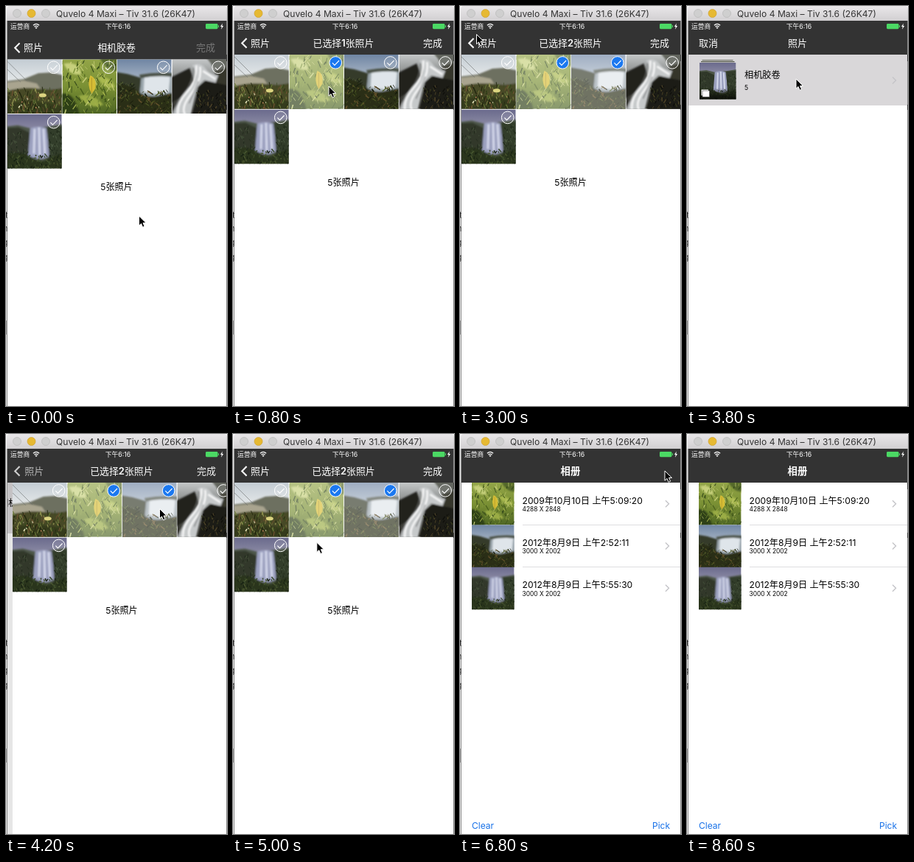
An HTML page for the animation above (8.8 s loop, 300 by 543 pixels).

```html
<!DOCTYPE html>
<html lang="zh-CN">
<head>
<meta charset="utf-8">
<title>Photo picker</title>
<style>
html, body { margin: 0; width: 100%; height: 100%; overflow: hidden; background: #fff; }
svg { display: block; width: 100vw; height: 100vh; }
text { font-family: Inter, "Noto Sans CJK SC", "Noto Sans CJK", "Noto Sans", sans-serif; white-space: pre; }
</style>
</head>
<body>
<svg id="stage" viewBox="0 0 300 543"></svg>
<script>
const LOOP = 8800, STEP = 200, W = 297, NAV = '#333';
const stage = document.getElementById('stage');

// ---- drawing helpers ----
const rect = (x, y, w, h, fill, more = '') =>
  `<rect x="${x}" y="${y}" width="${w}" height="${h}" fill="${fill}" ${more}/>`;
const path = (d, fill, more = '') => `<path d="${d}" fill="${fill}" ${more}/>`;
const line = (d, color, w, more = '') =>
  path(d, 'none', `stroke="${color}" stroke-width="${w}" ${more}`);
const text = (x, y, size, str, fill = '#000', more = '') =>
  `<text x="${x}" y="${y}" font-size="${size}" fill="${fill}" ${more}>${str}</text>`;
const group = (id, body, more = '') => `<g id="${id}" ${more}>${body}</g>`;
const soft = body => `<g filter="url(#blur)">${body}</g>`;
const photo = (n, x, y, size) =>
  `<use href="#photo${n}" transform="translate(${x} ${y}) scale(${size / 74})"/>`;
const grad = (id, ...colors) =>
  `<linearGradient id="${id}" x1="0" y1="0" x2="0" y2="1">${colors.map((c, i) =>
    `<stop offset="${i / (colors.length - 1)}" stop-color="${c}"/>`).join('')}</linearGradient>`;
const MID = 'text-anchor="middle"';

function rng(seed) {
  return () => (seed = (seed * 16807) % 2147483647) / 2147483647;
}

// Scattered leaves or grass inside a box
function leaves(seed, count, [x, y, w, h], colors, size, tilt) {
  const r = rng(seed);
  let out = '';
  for (let i = 0; i < count; i++) {
    const px = x + r() * w, py = y + r() * h, s = size * (0.5 + r());
    const dx = (r() - 0.5) * 2 * tilt * s, c = colors[Math.floor(r() * colors.length)];
    out += line(`M${px.toFixed(1)} ${py.toFixed(1)}l${dx.toFixed(1)} ${(-s).toFixed(1)}`, c, (0.6 + r()).toFixed(1));
  }
  return out;
}

// ---- photos, each in a 74 x 74 box ----
const photos = [
  rect(0, 0, 74, 74, 'url(#sky1)') +
  soft(path('M-4 30L22 27 42 19 58 18 78 22V50H-4Z', '#6d6f60') +
    path('M-4 32L22 29 40 33 46 42 -4 46Z', '#a9a48f') +
    path('M-4 44Q20 37 42 40T78 38V78H-4Z', '#474a26') +
    path('M-4 62Q30 52 78 64V78H-4Z', '#343a1b')) +
  leaves(11, 150, [0, 44, 74, 34], ['#23280f', '#69783a', '#8a8c4c', '#3a4a1e', '#6a5030'], 5, 0.6) +
  leaves(5, 9, [5, 52, 62, 18], ['#e6e8c0', '#c98a62'], 2, 1) +
  `<ellipse cx="48" cy="49" rx="5" ry="2.6" fill="#dcd480"/>` +
  line('M0 3L27 30M0 14L18 31', '#6a6d6c', 0.6),

  rect(0, 0, 74, 74, 'url(#leaf2)') +
  soft(path('M-4 48Q16 40 24 78H-4Z', '#2f3f16') + path('M50 -4Q60 18 78 16V-4Z', '#55692a') +
    path('M2 6Q22 2 26 20 10 24 2 6Z', '#c6d07c') + path('M48 24Q66 22 72 38 56 42 48 24Z', '#a9b950') +
    path('M22 50Q42 44 56 62 36 70 22 50Z', '#9aac45')) +
  leaves(23, 150, [0, 5, 74, 73], ['#a3b04a', '#4a601c', '#c6cd78', '#34481a', '#7c9238'], 6, 1) +
  path('M38 22Q47 25 45 40L40 47Q33 36 38 22Z', '#d6bd35') +
  line('M40 25L40 45', '#a58c28', 0.7),

  rect(0, 0, 74, 74, 'url(#sky3)') +
  soft(path('M-4 17L14 20 28 24 36 27V60H-4Z', '#343a2c') +
    path('M33 22Q54 17 78 21V52H30Z', '#9aa5ac') +
    path('M37 24Q54 20 72 24L70 45Q54 50 36 44Z', '#dfe5ea') +
    path('M30 21Q52 17 78 19V24Q52 21 32 26Z', '#4c5248') +
    path('M-4 33Q17 33 28 43T54 50L78 45V78H-4Z', '#2a2e15')) +
  leaves(31, 140, [0, 44, 74, 33], ['#4e5824', '#15190b', '#62502a', '#343f1a'], 3, 1.5) +
  leaves(37, 40, [0, 32, 28, 20], ['#4c5630', '#1e2414'], 3, 1.5),

  rect(0, 0, 74, 74, 'url(#sky4)') +
  soft(path('M-4 26L12 18 24 12 30 30 14 50 -4 62Z', '#23231e') +
    path('M44 -4Q54 4 58 16L78 24V-4Z', '#64665f') +
    path('M58 16L78 10V40L60 34Z', '#34342c') +
    path('M27 8Q39 3 45 12T63 22L59 33 44 28 34 38 25 78H-2Q8 54 24 38T27 8Z', '#c6c9ca') +
    path('M36 37L46 29 78 36V78H28Z', '#1c1b14')) +
  soft(line('M33 8Q34 30 20 45T8 76M38 10Q41 28 26 47T18 76M42 16L59 27', '#fbfbfb', 2.4) +
    line('M29 12Q29 30 17 45T2 74M36 30L23 60', '#77797a', 1.2)) +
  leaves(47, 70, [34, 44, 40, 33], ['#4a4026', '#0e0e0a', '#33351c'], 3.5, 0.8),

  rect(0, 0, 74, 74, 'url(#sky5)') +
  soft(path('M-4 17L14 15 30 19 54 17 78 13V78H-4Z', '#4d5648') +
    path('M-4 19L15 18 30 25 33 56 -4 66Z', '#303829') +
    path('M31 19Q42 15 53 19L58 56Q44 66 28 56Z', '#9ba0bf') +
    path('M54 18L78 16V68L57 60Z', '#333c2b') +
    line('M37 20L36 54M43 18L44 56M49 20L51 54', '#d3d7ea', 3) +
    path('M-4 54Q16 48 32 58T56 60L78 52V78H-4Z', '#2a341f')) +
  leaves(61, 110, [0, 57, 74, 20], ['#4b5830', '#182213', '#38482a'], 3, 1) +
  leaves(71, 50, [57, 24, 17, 38], ['#4a5840', '#222c1c'], 3, 0.7) +
  leaves(83, 45, [0, 26, 27, 32], ['#424d38', '#222b1d'], 3, 0.7)
];

// ---- screen parts ----
const chevron = (x, y) => line(`M${x} ${y - 4.5}l4.5 4.5 -4.5 4.5`, '#c4c4c8', 1.4);

const cells = photos.map((_, i) => ({ x: 2 + (i % 4) * 74.5, y: 66 + Math.floor(i / 4) * 74.5 }));

const gridCell = ({ x, y }, i) => photo(i + 1, x, y, 73.7) +
  rect(x, y, 73.7, 73.7, '#fff', `id="veil${i}" opacity=".33"`) +
  `<circle id="dot${i}" cx="${x + 62.7}" cy="${y + 10.9}" r="8.3" stroke="#fff" stroke-width="1"/>` +
  line(`M${x + 58.4} ${y + 11.2}l3 3.2 6.2 -6.4`, '#fff', 1.1);

const shots = [
  [2, '2009年10月10日 上午5:09:20', '4288 X 2848'],
  [3, '2012年8月9日 上午2:52:11', '3000 X 2002'],
  [5, '2012年8月9日 上午5:55:30', '3000 X 2002']
];

const shotRow = ([n, date, size], i) => {
  const y = 66 + i * 57.3;
  return photo(n, 16, y, 57.6) + text(84.5, y + 28.7, 12.1, date) +
    text(84.5, y + 39, 8.4, size) + chevron(279, y + 28.7) +
    (i < 2 ? rect(85, y + 57, 214, 0.6, '#c8c7cc') : '');
};

const basePage = rect(2, 20, W, 523, '#fff') + rect(2, 20, W, 46, NAV) +
  text(150, 54.8, 13.4, '相册', '#fff', MID + ' font-weight="600"') +
  group('shots', shots.map(shotRow).join('')) +
  text(16, 536, 12, 'Clear', '#1670e8') + text(261, 536, 12, 'Pick', '#1670e8');

const albumPage = rect(2, 66, W, 477, '#fff') +
  rect(2, 66, W, 69, '#d9d7d9', 'id="rowLight"') +
  rect(20.5, 73, 42, 1.2, '#6d7066') + rect(19, 75, 45.5, 1.2, '#4a5043') +
  photo(5, 17, 77, 49.5) + rect(17, 111, 49.5, 15.5, 'url(#shade)') +
  rect(19.5, 113.5, 9.5, 8, '#fff') + rect(21, 115, 9.5, 8.5, '#fff', 'stroke="#333" stroke-width=".5"') +
  text(78, 97.5, 12.2, '相机胶卷') + text(78, 114, 8.6, '5') + chevron(279, 101) +
  rect(2, 66, W, 477, '#000', 'id="dim"');

const gridPage = rect(2, 66, W, 477, '#fff') + cells.map(gridCell).join('') +
  text(150, 243.6, 12.1, '5张照片', '#000', MID);

const modal = group('albums', albumPage) + group('grid', gridPage) +
  rect(2, 20, W, 46, NAV) +
  text(16, 54.8, 13, '取消', '#fff', 'id="cancel"') +
  text(150, 54.8, 13, '照片', '#fff', 'id="albumTitle" ' + MID) +
  group('back', line('M18.5 44L12.2 50.4 18.5 56.8', '#fff', 2.1)) +
  text(24, 54.8, 13, '照片', '#fff', 'id="backLabel"') +
  text(150, 54.8, 12.9, '', '#fff', 'id="title" ' + MID) +
  text(258, 54.8, 13, '完成', '#fff', 'id="done"');

const statusBar = text(6, 31, 8.7, '运营商', '#fff') +
  line('M36.9 26.3Q41 22.6 45.1 26.3M38.5 28.2Q41 26 43.5 28.2', '#fff', 1.2) +
  path('M39.5 29.4Q41 28.2 42.5 29.4L41 31Z', '#fff') +
  text(152, 31, 8.8, '下午6:16', '#fff', MID) +
  rect(271, 24, 16.5, 7.2, '#4bd964', 'rx="1.4"') + rect(288.1, 26.2, 1, 2.8, '#4bd964') +
  path('M293.9 23.5L291 28H292.8L292 31.7 295.2 27H293.3Z', '#fff');

const button = (x, fill, edge) =>
  `<circle cx="${x}" cy="10" r="5.5" fill="${fill}" stroke="${edge}" stroke-width=".7"/>`;

const windowFrame = path('M1 20V4Q1 0 5 0H296Q300 0 300 4V20Z', 'url(#bar)') +
  button(15, '#cfcfcf', '#b8b8b8') + button(34.5, '#e6b932', '#cfa02c') + button(54, '#cfcfcf', '#b8b8b8') +
  text(162.5, 14.5, 12.1, 'Quvelo 4 Maxi – Tiv 31.6 (26K47)', '#333', MID) +
  rect(1, 20, 1, 523, '#8c8c8c') + rect(299, 20, 1, 523, '#8c8c8c') +
  rect(299, 66, 1, 9, '#444') + rect(299, 134, 1, 7, '#444') +
  `<g clip-path="url(#edge)">${rect(0, 20, 1, 523, '#ececec')}${rect(0, 427, 2, 19, '#999')}` +
  [['t', 288], ['n', 306], ['g', 325], ['g', 345]].map(([c, y]) =>
    text(2.5, y, 11, c, '#333', 'text-anchor="end"')).join('') + '</g>';

const pointer = path('M0 0V13.2L3 10.4 5.1 15.3 7.6 14.2 5.5 9.5H9.6Z', '#000',
  'stroke="#fff" stroke-width="1" stroke-linejoin="round"');

stage.innerHTML = '<defs>' +
  grad('bar', '#e9e7e9', '#d1cfd1') + grad('shade', '#0000', '#000b') +
  grad('sky1', '#c3ccd3', '#eceeee', '#c9c9c0') + grad('leaf2', '#93a548', '#7a9034', '#4f6624') +
  grad('sky3', '#6f85a3', '#b9c3cf', '#76807c') + grad('sky4', '#c4c7c8', '#6d706d', '#201f19') +
  grad('sky5', '#6a6a8c', '#a4a2b6', '#5f665e') +
  '<filter id="blur" x="-20%" y="-20%" width="140%" height="140%"><feGaussianBlur stdDeviation="1.1"/></filter>' +
  `<clipPath id="screen">${rect(2, 20, W, 523, '#000')}</clipPath>` +
  `<clipPath id="edge">${rect(0, 20, 2, 523, '#000')}</clipPath>` +
  `<clipPath id="square">${rect(0, 0, 74, 74, '#000')}</clipPath>` +
  photos.map((p, i) => group('photo' + (i + 1), p, 'clip-path="url(#square)"')).join('') +
  '</defs>' + rect(0, 0, 300, 543, '#fff') +
  `<g clip-path="url(#screen)">${basePage}${group('modal', modal)}${statusBar}</g>` +
  windowFrame + group('cursor', pointer);

// ---- motion ----
const el = {};
stage.querySelectorAll('[id]').forEach(e => el[e.id] = e);
const set = (id, name, v) => el[id].setAttribute(name, v);
const move = (id, x, y) => set(id, 'transform', `translate(${x} ${y})`);
const show = (id, on) => set(id, 'visibility', on ? 'visible' : 'hidden');

// Share of the way left for a slide that begins at start
const left = (t, start) => (1 - Math.min(1, Math.max(0, (t - start) / 500))) ** 3;

// time, x, y of the pointer tip
const trail = [
  [0, 180.5, 285], [200, 180.5, 285], [700, 130, 110], [900, 130, 108], [1200, 197, 106],
  [1500, 248, 102], [2200, 248, 102], [2900, 22.5, 38.5], [3200, 22.5, 38.5], [3700, 148, 99],
  [3900, 148, 99], [4200, 208.5, 101.5], [4600, 209, 106], [5300, 52, 174], [5500, 52, 174],
  [6100, 278, 50], [7300, 278, 50], [8000, 271, 521], [8800, 271, 521]
];

function pointerAt(t) {
  const i = trail.findIndex(k => k[0] > t);
  const [t0, x0, y0] = trail[i - 1], [t1, x1, y1] = trail[i];
  const u = (t - t0) / (t1 - t0), e = u * u * (3 - 2 * u);
  return [x0 + (x1 - x0) * e, y0 + (y1 - y0) * e];
}

const picked = t => [false, t >= 800, t >= 1200, t >= 1600 && t < 2200, t >= 5400];

function draw(t) {
  const sheet = t < 3000 ? left(t, -385) : 1 - left(t, 6250);
  move('modal', 0, 523 * sheet);
  show('modal', sheet < 1);
  show('shots', t >= 6200);

  const p = t < 3843 ? left(t, 3050) : 1 - left(t, 3843);
  const fade = p ** 20;
  move('grid', W * (1 - p), 0);
  move('albums', -0.3 * W * p, 0);
  set('dim', 'opacity', 0.1 * p);
  show('rowLight', sheet < 1 && t >= 3800 && t < 4400);

  set('cancel', 'opacity', (1 - p) ** 2);
  set('albumTitle', 'opacity', 1 - p);
  move('albumTitle', -113 * p, 0);
  set('back', 'opacity', p ** 12);
  set('backLabel', 'opacity', fade);
  move('backLabel', 50 * (1 - p), 0);

  const on = picked(t), n = on.filter(Boolean).length;
  on.forEach((v, i) => {
    set('veil' + i, 'opacity', v ? 0.33 : 0);
    set('dot' + i, 'fill', v ? '#1b78f0' : '#ffffff18');
  });
  const title = n ? `已选择<tspan font-weight="600">${n}</tspan>张照片` : '相机胶卷';
  if (el.title.innerHTML !== title) el.title.innerHTML = title;
  move('title', W / 2 * (1 - p) + 3.5 * (p < 1 ? p : 0), 0);
  set('title', 'opacity', Math.min(1, p * 1.2));
  set('done', 'fill', !n ? '#777' : t >= 6200 ? '#5a5a5a' : '#fff');
  set('done', 'opacity', p * p);
  move('done', 40 * (1 - p), 0);

  move('cursor', ...pointerAt(t));
  show('cursor', t < 8200);
}

const start = performance.now();
function tick(now) {
  const t = Math.max(0, now - start) % LOOP;
  draw(Math.floor(t / STEP) * STEP);
  requestAnimationFrame(tick);
}
draw(0);
requestAnimationFrame(tick);
</script>
</body>
</html>
```
